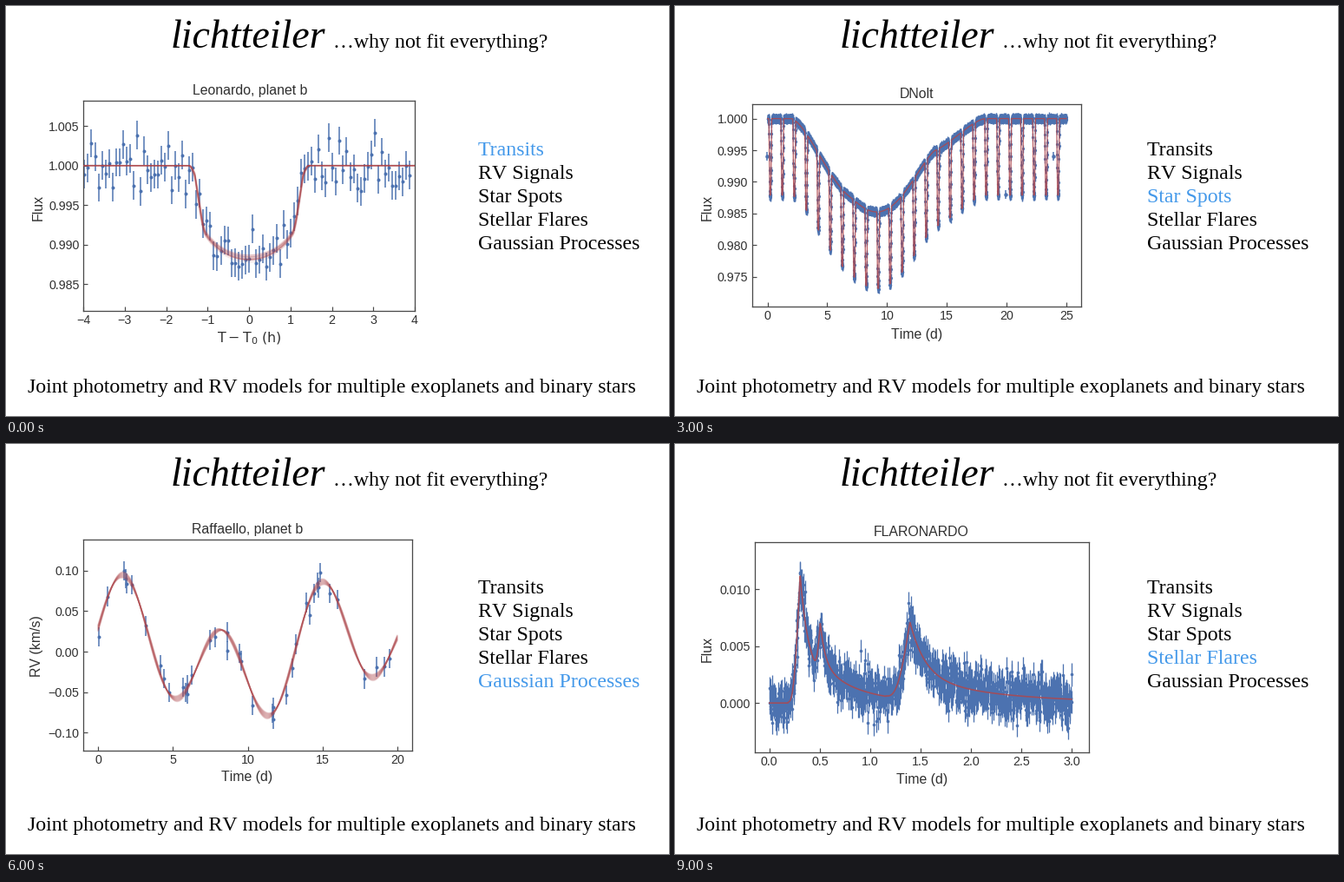
These frames come from a looping animation (764 px wide and 472 px high, 10 s). A matplotlib script:

```python
import numpy as np
import matplotlib.pyplot as plt
from matplotlib.animation import FuncAnimation

W, H, DPI = 764, 472, 64
PX = 72 / DPI  # points per pixel
BLUE, RED, INK, EDGE = "#4c72b0", "#b0474c", "#303030", "#4a4a4a"
ACTIVE = "#4499ea"
TICK, LABEL, BODY = 14.3 * PX, 15.9 * PX, 23.9 * PX

plt.rcParams["font.family"] = "Liberation Sans"
plt.rcParams["text.kerning_factor"] = 6  # no kerning
fig = plt.figure(figsize=(W / DPI, H / DPI), dpi=DPI, facecolor="white")


def put(owner, x, y, s, size, **kw):
    """Text with its baseline at stage pixel (x, y), y counted downwards."""
    return owner.text(x / W, 1 - y / H, s, fontsize=size, va="baseline",
                      transform=fig.transFigure, **kw)


def panel(box, xlim, ylim, xticks, yticks, xfmt, yfmt, title, xlabel, ylabel):
    """Axes framed by pixel box; title, xlabel, ylabel are (text, x, y)."""
    x0, y0, x1, y1 = box
    ax = fig.add_axes([x0 / W, 1 - y1 / H, (x1 - x0) / W, (y1 - y0) / H])
    ax.set(xlim=xlim, ylim=ylim)
    minus = lambda s: s.replace("-", "\u2212")
    ax.set_xticks(xticks, [minus(xfmt % v) for v in xticks])
    ax.set_yticks(yticks, [minus(yfmt % v) for v in yticks])
    ax.tick_params(direction="in", length=5 * PX, width=1.2 * PX, pad=4.6 * PX,
                   color=EDGE, labelcolor=INK, labelsize=TICK)
    for spine in ax.spines.values():
        spine.set(linewidth=1.3 * PX, edgecolor=EDGE)
    for text, x, y in (title, xlabel):
        put(ax, x, y, text, LABEL, color=INK, ha="center")
    text, x, y = ylabel
    put(ax, x, y, text, LABEL, color=INK, ha="center",
        rotation=90, rotation_mode="anchor")
    return ax


def points(ax, x, y, err, size=4.0, width=1.5):
    ax.errorbar(x, y, yerr=err, fmt="o", color=BLUE, ms=size * PX, mew=0,
                elinewidth=width * PX, capsize=0, zorder=2)


def line(ax, x, y, width=1.5, alpha=1.0):
    ax.plot(x, y, color=RED, lw=width * PX, alpha=alpha, zorder=3)


def smoothstep(u):
    u = np.clip(u, 0, 1)
    return u * u * (3 - 2 * u)


def transit(t, depth=0.01155, limb=0.65, edge=1.45):
    """Limb-darkened dip around t = 0, in hours."""
    mu = np.sqrt(np.clip(1 - (t / 1.3) ** 2, 0, 1))
    return 1 - depth * (1 - limb * (1 - mu)) * smoothstep((edge - abs(t)) / 0.4)


def transit_panel():
    ax = panel((89, 108.6, 471, 350.8), (-4, 4),
               (1 - 167 / 9100, 1 + 75 / 9100),
               range(-4, 5), np.arange(0.985, 1.006, 0.005), "%d", "%.3f",
               ("Leonardo, planet b", 281, 102),
               (r"$\mathrm{T - T_0\ (h)}$", 280, 387), ("Flux", 42, 232))
    rng = np.random.default_rng(4)
    t = np.linspace(-3.97, 3.874, 94)
    points(ax, t, transit(t) + rng.normal(0, 0.0017, t.size), 0.0018)
    t = np.linspace(-4, 4, 800)
    for _ in range(20):
        dip = transit(t, rng.normal(0.01155, 0.0003), rng.normal(0.65, 0.03),
                      rng.normal(1.45, 0.012))
        line(ax, t, dip, 1.4, 0.13)
    return ax


def rv_panel():
    ax = panel((89, 109.6, 468, 352.7), (-103 / 345, 0.8),
               (-113.5 / 930, 129.5 / 930),
               np.arange(-1, 5) * 0.2, np.arange(-2, 3) * 0.05,
               "%.1f", "%.2f",
               ("Donatello, planet b", 278, 103.5), ("Phase", 278, 388),
               ("RV (km/s)", 40, 233))
    points(ax, [-0.149, -0.149, 0.028, 0.147, 0.587, 0.735],
           [0.080, 0.0725, -0.0135, -0.0962, 0.0554, 0.1134], 0.014)
    p = np.linspace(-0.25, 0.75, 300)
    for amp in np.linspace(0.0945, 0.1, 18):
        line(ax, p, -amp * np.sin(2 * np.pi * p), 1.6, 0.13)
    return ax


def spot(t, centre, half, amp):
    """Dimming by a foreshortened spot crossing the disc."""
    angle = np.clip((t - centre) / half, -1, 1) * np.pi / 2
    return amp * np.maximum(np.cos(angle), 0) ** 1.5


def spot_panel():
    ax = panel((88.6, 112.6, 468, 345.7), (-18 / 13.78, 361.5 / 13.78),
               (1 - 216 / 7280, 1 + 17 / 7280),
               range(0, 26, 5), np.arange(0.975, 1.001, 0.005),
               "%d", "%.3f", ("DNolt", 279, 106), ("Time (d)", 279, 383),
               ("Flux", 42, 232))
    t = np.arange(0, 25, 0.01)
    base = 1 - spot(t, 8, 6, 0.0132) - spot(t, 12.6, 5.6, 0.0057)
    phase = (t - 0.23 + 0.5) % 1.003 - 0.5
    model = base - 0.0121 * smoothstep((0.125 - abs(phase)) / 0.09)

    rng = np.random.default_rng(7)
    points(ax, t, model + rng.normal(0, 0.00012, t.size), 0.00065, 3.2, 1.4)
    points(ax, [-0.05, 23.9, 19.95], [0.994, 0.994, 0.988], 0.0007, 4.5)
    line(ax, t, model, 1.3, 0.85)
    return ax


def flare(t, peak, width, amp):
    """Polynomial rise, then a double exponential decay."""
    s = (t - peak) / width
    rise = 1 + 1.941 * s - 0.175 * s**2 - 2.246 * s**3 - 1.125 * s**4
    late = np.maximum(s, 0)
    decay = 0.692 * np.exp(-1.6 * late) + 0.308 * np.exp(-0.2783 * late)
    return amp * np.where(s < -1, 0, np.where(s < 0, rise, decay))


def flare_panel():
    ax = panel((91.8, 112.7, 477, 354.8), (-17 / 116, 368 / 116),
               (-56.5 / 13080, 185 / 13080),
               np.arange(0, 3.1, 0.5), [0, 0.005, 0.01], "%.1f", "%.3f",
               ("FLARONARDO", 284, 105.5), ("Time (d)", 284.5, 390.5),
               ("Flux", 42, 236))
    t = np.linspace(0, 3, 1000)
    model = (flare(t, 0.305, 0.12, 0.0113) + flare(t, 0.505, 0.07, 0.0043)
             + flare(t, 1.395, 0.24, 0.0068))
    rng = np.random.default_rng(11)
    points(ax, t, model + rng.normal(0, 0.00095, t.size), 0.001, 3.6, 1.3)
    line(ax, t, model, 1.6, 0.85)
    return ax


def process_panel():
    ax = panel((89, 109.6, 468, 352.7), (-1, 21), (-0.122, 0.139),
               range(0, 21, 5), np.arange(-2, 3) * 0.05, "%d", "%.2f",
               ("Raffaello, planet b", 278, 103.5), ("Time (d)", 278, 388),
               ("RV (km/s)", 40, 233))
    wave = lambda t: 0.06 * np.sin(0.95 * t) + 0.035 * np.sin(0.41 * t + 1)
    rng = np.random.default_rng(3)
    t = np.sort(rng.uniform(0, 20, 40))
    points(ax, t, wave(t) + rng.normal(0, 0.008, t.size), 0.012)
    t = np.linspace(0, 20, 400)
    for shift in np.linspace(-0.004, 0.004, 18):
        line(ax, t, wave(t) + shift * np.cos(1.7 * t), 1.6, 0.13)
    return ax


serif = dict(family="Liberation Serif", color="black")
put(fig, 190, 48.5, "lichtteiler", 46 * PX, style="italic", **serif)
put(fig, 377.2, 48, "\u2026why not fit everything?", BODY, **serif)
put(fig, 25, 445, "Joint photometry and RV models for multiple exoplanets "
    "and binary stars", BODY, **serif)

TOPICS = ["Transits", "RV Signals", "Star Spots", "Stellar Flares",
          "Gaussian Processes"]
items = [put(fig, 544, 172 + 27 * k, s, BODY, **serif)
         for k, s in enumerate(TOPICS)]
panels = [transit_panel(), rv_panel(), spot_panel(), flare_panel(),
          process_panel()]
ORDER = [0, 4, 1, 2, 3]


def update(i):
    current = ORDER[i % len(ORDER)]
    for k, (ax, item) in enumerate(zip(panels, items)):
        ax.set_visible(k == current)
        item.set_color(ACTIVE if k == current else "black")
    return panels + items


anim = FuncAnimation(fig, update, frames=10, interval=1000, repeat=True,
                     init_func=lambda: update(0))
plt.show()
```
